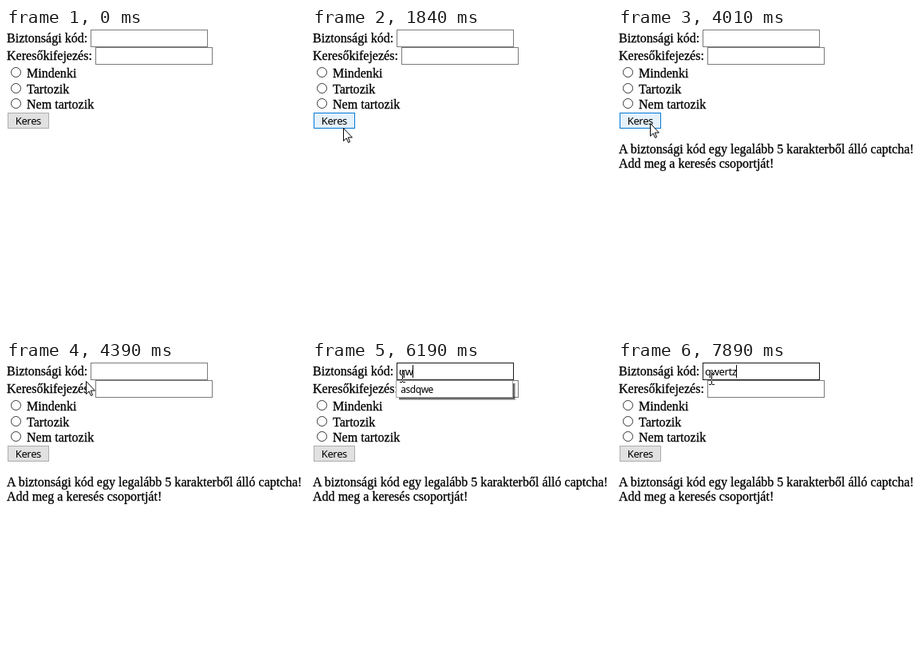
An HTML page for the animation above (8 s loop, 376x382 px).

```html
<!DOCTYPE html>
<html lang="hu">
<head>
<meta charset="utf-8">
<title>Keresés</title>
<style>
html, body { margin: 0; width: 100%; height: 100%; overflow: hidden; background: #fff; }
svg { display: block; }
text { font: 16px "Liberation Serif", "Times New Roman", serif; letter-spacing: .02px; stroke: #000; stroke-width: .3px; white-space: pre; }
.ui { font: 13px "Noto Sans", sans-serif; letter-spacing: -.35px; stroke: none; }
.small { font-size: 12px; letter-spacing: -.45px; }
.field { fill: #fff; stroke: #7a7a7a; }
.field.hover { stroke: #171717; }
.radio { fill: #fff; stroke: #333; }
#button { fill: #e1e1e1; stroke: #adadad; }
#button.hover { fill: #e5f1fb; stroke: #0078d7; }
#button.press { fill: #cce4f7; stroke: #005499; }
#beam { fill: #fff; mix-blend-mode: difference; }
</style>
</head>
<body>
<svg width="376" height="382" viewBox="0 0 376 382">
  <rect width="376" height="382" fill="#fff"/>
  <text x="1" y="18">Biztonsági kód:</text>
  <text x="1" y="40">Keresőkifejezés:</text>
  <rect class="field" x="112.5" y="24.5" width="146" height="21"/>
  <rect class="field" id="code" x="106.5" y="2.5" width="146" height="21"/>
  <circle class="radio" cx="12.5" cy="55.5" r="6"/>
  <circle class="radio" cx="12.5" cy="75.5" r="6"/>
  <circle class="radio" cx="12.5" cy="94.5" r="6"/>
  <text x="26" y="62">Mindenki</text>
  <text x="26" y="82">Tartozik</text>
  <text x="26" y="101">Nem tartozik</text>
  <rect id="button" x="2.5" y="106.5" width="51" height="19"/>
  <text class="ui" x="11.7" y="121">Keres</text>
  <g id="message">
    <text x="1" y="157">A biztonsági kód egy legalább 5 karakterből álló captcha!</text>
    <text x="1" y="175">Add meg a keresés csoportját!</text>
  </g>
  <text class="ui" id="typed" x="109" y="18"></text>
  <rect id="caret" y="5" width="1" height="16"/>
  <g id="list">
    <g fill-opacity=".3">
      <rect x="109" y="28" width="144" height="19"/>
      <rect x="109" y="28" width="145" height="20"/>
      <rect x="109" y="28" width="146" height="21"/>
    </g>
    <rect x="105.5" y="24.5" width="146" height="21" fill="#fff" stroke="#a0a0a0"/>
    <text class="ui small" x="111.2" y="40">asdqwe</text>
  </g>
  <path id="arrow" d="M.5 .5V16.5L4.1 13 6.6 18.5 8.6 17.6 6.2 12.1H11.4Z" fill="#fff" stroke="#000"/>
  <path id="beam" d="M0 0H3V1H0ZM4 0H7V1H4ZM3 1H4V15H3ZM0 15H3V16H0ZM4 15H7V16H4Z"/>
</svg>
<script>
const LOOP = 8000, TICK = 76;
const [code, button, message, typed, caret, list, arrow, beam] =
  ["code", "button", "message", "typed", "caret", "list", "arrow", "beam"]
    .map(id => document.getElementById(id));

// Pointer strokes; the pointer rests where each one ends
const strokes = [
  { start: 530, end: 610, from: [244, 373], to: [221, 354] },
  { start: 760, end: 1300, from: [224, 350], to: [124, 226] },
  { start: 1300, end: 1520, from: [124, 226], to: [68, 164] },
  { start: 1590, end: 1900, from: [62, 146], to: [37, 124], power: 2 },
  { start: 4010, end: 4390, from: [40, 119], to: [100, 25] },
  { start: 4470, end: 4710, from: [102, 18], to: [110, 11] },
  { start: 5570, end: 5720, from: [99, 11], to: [110, 11] },
  { start: 6820, end: 6900, from: [114, 14], to: [114, 14] }
];
const word = "qwertz";
const keyTimes = [5870, 6190, 6340, 7350, 7580, 7890];

const within = (t, a, b) => t >= a && t < b;
const show = (node, on) => node.setAttribute("visibility", on ? "visible" : "hidden");

// The pointer is sampled once per tick, so it moves in small jumps
function pointerAt(t) {
  const stroke = strokes.findLast(s => s.start <= t);
  if (!stroke) return null;
  const { start, end, from, to, power = 1 } = stroke;
  const n = Math.round((end - start) / TICK);
  const u = Math.min(1, Math.floor((t - start) / (end - start) * n) / n);
  const k = 1 - (1 - u) ** power;
  return from.map((a, i) => Math.round(a + (to[i] - a) * k));
}

function draw(t) {
  const pointer = pointerAt(t);
  const [x, y] = pointer || [-50, -50];
  const inField = within(x, 106, 253) && within(y, 2, 24);
  const onButton = within(x, 2, 54) && within(y, 106, 126);
  show(arrow, pointer && !inField);
  show(beam, inField);
  for (const node of [arrow, beam]) node.setAttribute("transform", `translate(${x} ${y})`);

  code.classList.toggle("hover", inField);
  button.classList.toggle("hover", onButton);
  button.classList.toggle("press", within(t, 2070, 2220));

  show(message, t >= 2300);
  show(list, within(t, 6100, 7350));
  typed.textContent = word.slice(0, keyTimes.filter(k => k <= t).length);
  caret.setAttribute("x", Math.floor(109 + typed.getComputedTextLength()));
  show(caret, t >= 5720 && !within(t, 6570, 7120));
}

const begin = performance.now();
function tick() {
  draw((performance.now() - begin) % LOOP);
  requestAnimationFrame(tick);
}
draw(0);
requestAnimationFrame(tick);
</script>
</body>
</html>
```
